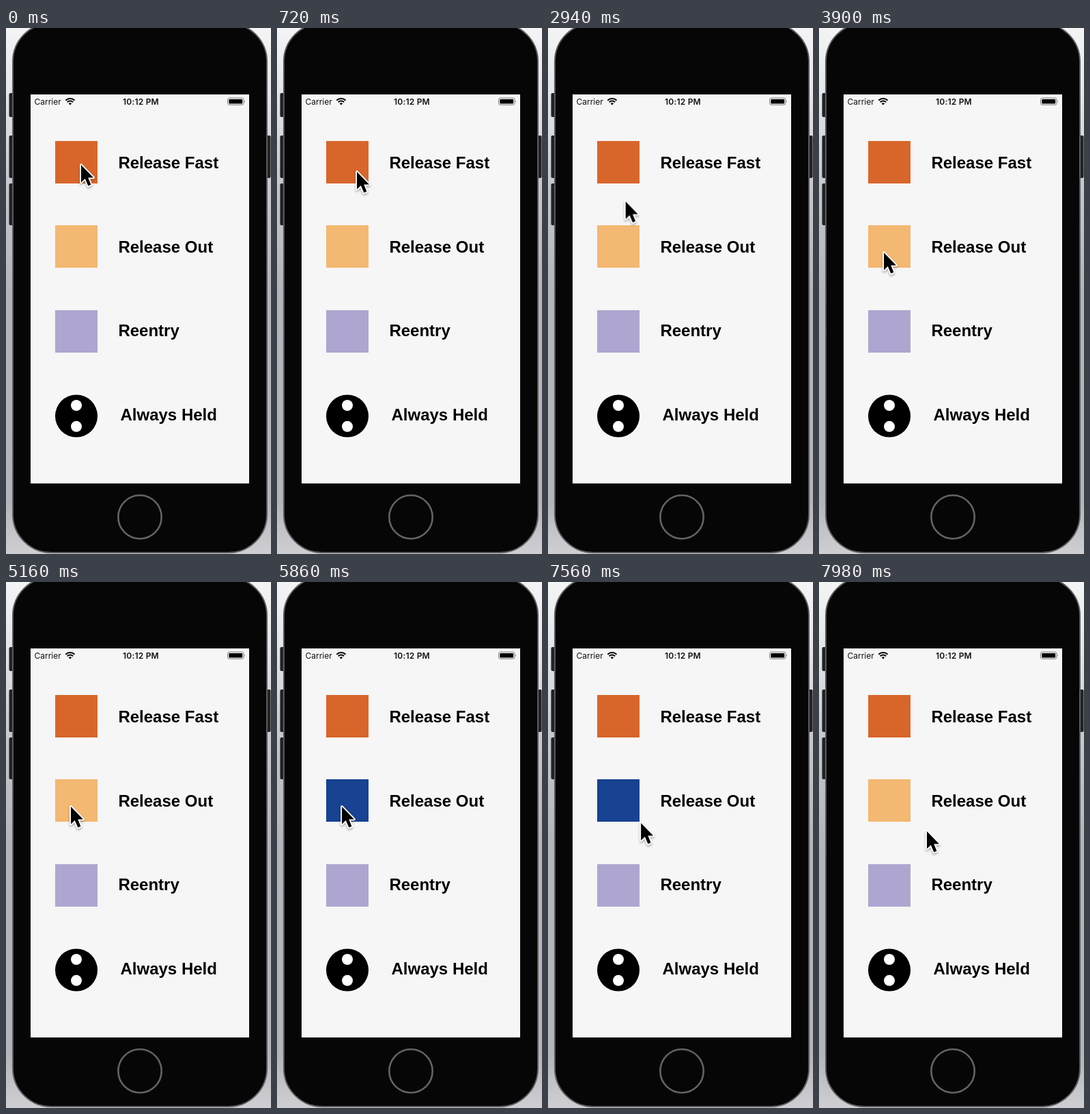
These frames come from a looping animation (388 px wide and 768 px high, 8 s). An HTML page:

```html
<!DOCTYPE html>
<html lang="en">
<head>
<meta charset="utf-8">
<title>Touch states</title>
<style>
  html, body { margin: 0; width: 100%; height: 100%; overflow: hidden; background: #f6f6f6; }
  svg { display: block; width: 388px; height: 768px; }
  .label { font: bold 24px "Liberation Sans", Arial, sans-serif; }
  .status { font: 12px Inter, Roboto, sans-serif; fill: #111; }
  .clock { font-weight: 600; letter-spacing: .2px; text-anchor: middle; }
</style>
</head>
<body>
<svg viewBox="0 0 388 768">
  <defs>
    <linearGradient id="backdrop" x2="0" y2="1">
      <stop offset="0" stop-color="#f4f4f5"/>
      <stop offset=".12" stop-color="#e6e6ea"/>
      <stop offset=".3" stop-color="#c6c6cd"/>
      <stop offset=".5" stop-color="#b4b4bc"/>
      <stop offset=".9" stop-color="#b4b4ba"/>
      <stop offset="1" stop-color="#cfcfd3"/>
    </linearGradient>
    <filter id="shadow" x="-50%" y="-50%" width="200%" height="200%">
      <feDropShadow dx="0" dy="2" stdDeviation="1.5" flood-color="#333" flood-opacity=".4"/>
    </filter>
  </defs>

  <rect width="388" height="768" fill="url(#backdrop)"/>

  <g fill="#222224">
    <rect x="4.5" y="95" width="9" height="35" rx="2"/>
    <rect x="4.5" y="157" width="9" height="62" rx="2"/>
    <rect x="4.5" y="227" width="9" height="61" rx="2"/>
    <rect x="378" y="157" width="9.5" height="62" rx="2"/>
  </g>
  <rect x="10" y="-7" width="372" height="773" rx="56" fill="#060606" stroke="#5c5c60" stroke-width="2"/>
  <circle cx="196" cy="714" r="31.7" fill="none" stroke="#636363" stroke-width="2.6"/>
  <rect x="36" y="97" width="320" height="568" fill="#f6f6f6"/>

  <text class="status" x="41.5" y="111.5">Carrier</text>
  <text class="status clock" x="197.5" y="111.5">10:12 PM</text>
  <g fill="none" stroke="#000" stroke-width="2">
    <path d="M87.3 105.8a9.3 9.3 0 0 1 13.2 0M89.7 108.3a5.9 5.9 0 0 1 8.4 0"/>
    <path d="M93.9 112.6l-2.2-2.3a3.1 3.1 0 0 1 4.4 0z" fill="#000" stroke="none"/>
  </g>
  <rect x="324.5" y="102.2" width="23.5" height="10" rx="2.5" fill="none" stroke="#777"/>
  <rect x="326.3" y="104" width="19.9" height="6.4" rx="1" fill="#000"/>
  <path d="M349.2 105.4q1.5 1.8 0 3.6z" fill="#777"/>

  <rect id="fastSquare" x="72" y="165" width="62" height="62" fill="#d8662b"/>
  <rect id="outSquare" x="72" y="288" width="62" height="62" fill="#f3b872"/>
  <rect x="72" y="412" width="62" height="62" fill="#aea6d0"/>
  <circle cx="103" cy="566.5" r="31"/>
  <g fill="#fff">
    <circle cx="103" cy="551" r="8"/>
    <circle cx="103" cy="581.8" r="8"/>
  </g>

  <g class="label">
    <text x="164.4" y="205">Release Fast</text>
    <text x="164.4" y="328">Release Out</text>
    <text x="164.4" y="450">Reentry</text>
    <text x="167.5" y="573">Always Held</text>
  </g>

  <g id="cursor">
    <path d="M0 0V25.5L5.8 20L10.3 30.5L14.4 28.7L10.2 18.4H18Z" stroke="#fff" stroke-width="3.6"
      stroke-linejoin="round" paint-order="stroke" filter="url(#shadow)"/>
  </g>
</svg>
<script>
const DURATION = 8000;

function play(id, steps, toFrame) {
  const frames = steps.map(([ms, ...rest]) => ({ offset: ms / DURATION, ...toFrame(...rest) }));
  document.getElementById(id).animate(frames, { duration: DURATION, iterations: Infinity });
}

// time, tip x, tip y, easing towards the next step
play('cursor', [
  [0, 110, 200, 'ease-in-out'],
  [720, 117, 210],
  [2100, 117, 210, 'ease-in'],
  [2500, 123, 216, 'ease-in-out'],
  [3600, 95, 328],
  [6500, 95, 328, 'ease-in'],
  [7120, 113, 339],
  [7980, 158, 364],
  [8000, 158, 364]
], (x, y, easing = 'linear') => ({ transform: `translate(${x}px, ${y}px)`, easing }));

const PRESSED = '#184292';

function press(id, idle, from, to) {
  play(id, [[0, idle], [from, PRESSED], [to, idle], [DURATION, idle]],
    fill => ({ fill, easing: 'step-end' }));
}

press('fastSquare', '#d8662b', 820, 2500);
press('outSquare', '#f3b872', 5450, 7700);
</script>
</body>
</html>
```
